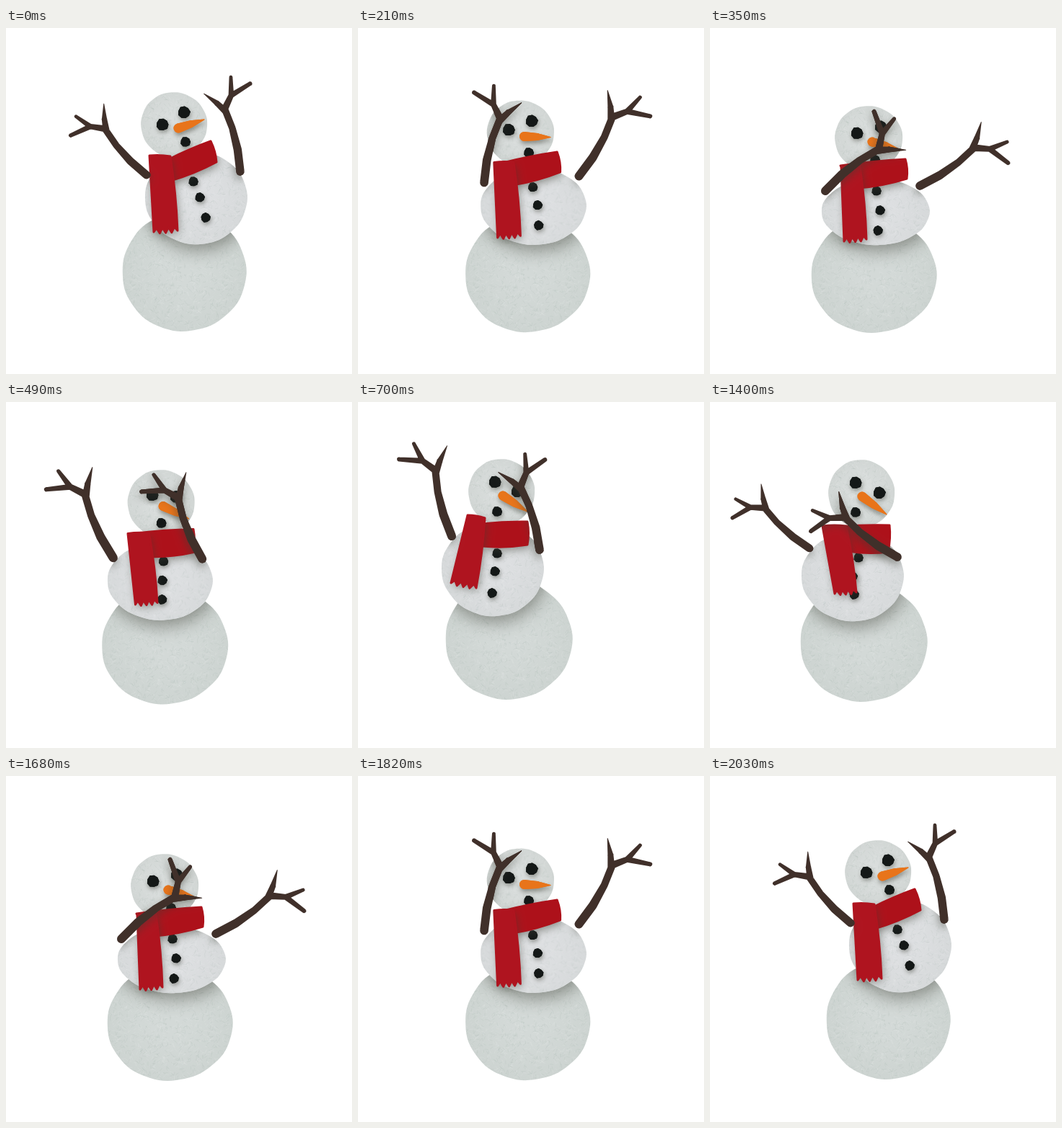
Recreate the animation shown at these times as an HTML page with a canvas. Size 480 by 480 pixels, loop 2100 ms.

```html
<!DOCTYPE html>
<html lang="en">
<head>
<meta charset="utf-8">
<title>Dancing snowman</title>
<style>
html, body { margin: 0; height: 100%; overflow: hidden; background: #fff; }
canvas { display: block; width: 100vw; height: 100vh; }
</style>
</head>
<body>
<canvas id="stage" width="480" height="480"></canvas>
<script>
const ctx = document.getElementById('stage').getContext('2d');
const STEP = 70, STEPS = 30;

// Balls: x, y, rx, ry. Scarf pieces: four corners, clockwise from top left.
const reach = {
  base: [247, 338, 86, 83], torso: [264, 236, 71, 64], head: [233, 134, 46, 45],
  eyes: [217, 134, 247, 117], nose: [239, 139, 275, 127], mouth: [249, 158],
  buttons: [260, 213, 269, 235, 277, 263],
  collar: [226, 182, 284, 157, 292, 186, 228, 212],
  tail: [199, 177, 228, 178, 238, 281, 205, 283]
};
const squash = {
  base: [227, 343, 87, 80], torso: [230, 255, 75, 46], head: [220, 153, 47, 45],
  eyes: [204, 146, 237, 137], nose: [225, 158, 262, 168], mouth: [229, 183],
  buttons: [231, 226, 236, 253, 233, 281],
  collar: [181, 191, 271, 182, 273, 209, 205, 222],
  tail: [182, 193, 208, 192, 217, 293, 186, 296]
};
const lean = {
  base: [213, 333, 88, 83], torso: [198, 242, 71, 62], head: [210, 127, 46, 47],
  eyes: [202, 112, 235, 126], nose: [211, 131, 245, 156], mouth: [202, 153],
  buttons: [206, 216, 198, 242, 200, 267],
  collar: [180, 173, 249, 171, 247, 208, 192, 207],
  tail: [156, 172, 189, 172, 203, 264, 173, 266]
};
const stretch = {
  base: [209, 329, 88, 84], torso: [187, 232, 71, 65], head: [199, 125, 46, 46],
  eyes: [190, 111, 221, 124], nose: [201, 130, 235, 152], mouth: [193, 152],
  buttons: [193, 210, 190, 235, 186, 265],
  collar: [172, 169, 235, 166, 235, 198, 172, 200],
  tail: [152, 157, 176, 161, 164, 258, 129, 251]
};
const sway = {
  base: [205, 335, 89, 83], torso: [179, 239, 69, 66], head: [200, 136, 46, 46],
  eyes: [194, 121, 224, 139], nose: [201, 141, 231, 170], mouth: [190, 162],
  buttons: [184, 217, 180, 242, 176, 272],
  collar: [160, 179, 227, 171, 227, 206, 160, 208],
  tail: [147, 163, 172, 176, 108, 258, 85, 241]
};
const bodyKeys = [[0, reach], [5, squash], [9, lean], [10, stretch], [13, sway], [14, sway]];

// Arms: shoulder x, y, angle in degrees, scale, flip.
const armKeys = [
  [0, { left: [195, 204, -42, .92, 1], right: [325, 199, -14, .95, -1] }],
  [1, { left: [190, 203, -24, .95, 1], right: [322, 192, 4, 1.02, -1] }],
  [5, { left: [160, 226, 52, 1, 1], right: [291, 219, 55, .98, -1] }],
  [8, { left: [143, 211, -62, 1.04, 1], right: [263, 217, -60, .97, 1] }],
  [9, { left: [138, 203, -48, .89, 1], right: [260, 215, -53, .97, 1] }],
  [10, { left: [130, 186, -14, 1, 1], right: [252, 205, -17, .97, -1] }],
  [13, { left: [127, 186, 20, 1.02, 1], right: [236, 206, 27, .94, -1] }],
  [14, { left: [126, 189, 26, 1.02, 1], right: [234, 209, 33, .94, -1] }]
];

function poseAt(keys, s) {
  let i = 0;
  while (i < keys.length - 2 && s >= keys[i + 1][0]) i++;
  const [t0, a] = keys[i], [t1, b] = keys[i + 1];
  const t = (s - t0) / (t1 - t0);
  const pose = {};
  for (const part in a) pose[part] = a[part].map((v, n) => v + (b[part][n] - v) * t);
  return pose;
}

// Felt: short fibres scattered by a seeded generator.
function makeFelt() {
  let seed = 7;
  const rand = () => (seed = seed * 16807 % 2147483647) / 2147483647;
  const tile = document.createElement('canvas');
  tile.width = tile.height = 128;
  const g = tile.getContext('2d');
  for (let i = 0; i < 900; i++) {
    const x = rand() * 128, y = rand() * 128, a = rand() * 6.28;
    g.strokeStyle = rand() < .5 ? 'rgba(255,255,255,.1)' : 'rgba(70,95,90,.05)';
    g.beginPath();
    g.moveTo(x, y);
    g.lineTo(x + 5 * Math.cos(a), y + 5 * Math.sin(a));
    g.stroke();
  }
  return ctx.createPattern(tile, 'repeat');
}
const felt = makeFelt();

// The shadow falls only on pieces already laid down.
function lay(path, fill, blur, dx, dy, fuzzy) {
  ctx.save();
  ctx.fillStyle = fill;
  if (blur) {
    ctx.globalCompositeOperation = 'source-atop';
    ctx.shadowColor = 'rgba(60,62,52,.5)';
    ctx.shadowBlur = blur;
    ctx.shadowOffsetX = dx;
    ctx.shadowOffsetY = dy;
    ctx.fill(path);
  }
  ctx.globalCompositeOperation = 'source-over';
  ctx.shadowColor = 'transparent';
  ctx.fill(path);
  if (fuzzy) {
    ctx.fillStyle = felt;
    ctx.fill(path);
  }
  ctx.restore();
}

function ball([x, y, rx, ry], light, dark, seed, blur) {
  const path = new Path2D();
  for (let i = 0; i < 90; i++) {
    const a = i / 90 * Math.PI * 2;
    const k = 1 + .006 * Math.sin(3 * a + seed) + .004 * Math.sin(11 * a + seed * 2);
    path.lineTo(rx * k * Math.cos(a), ry * k * Math.sin(a));
  }
  path.closePath();
  const shade = ctx.createRadialGradient(0, -ry * .1, rx * .3, 0, 0, rx * 1.1);
  shade.addColorStop(0, light);
  shade.addColorStop(1, dark);
  ctx.save();
  ctx.translate(x, y);
  lay(path, shade, blur, 2, 8, true);
  ctx.restore();
}

function dots(points, r) {
  for (let i = 0; i < points.length; i += 2) {
    const path = new Path2D();
    for (let n = 0; n < 9; n++) {
      const a = n / 9 * Math.PI * 2 + i;
      const k = r * (1 + .06 * Math.sin(n * 2.3));
      path.lineTo(points[i] + k * Math.cos(a), points[i + 1] + k * Math.sin(a));
    }
    path.closePath();
    lay(path, '#141817', 6, 1, 3);
  }
}

// Tapered strip with round ends.
function twig(path, x0, y0, x1, y1, w0, w1) {
  const len = Math.hypot(x1 - x0, y1 - y0);
  const nx = (y0 - y1) / len / 2, ny = (x1 - x0) / len / 2;
  path.moveTo(x0 + nx * w0, y0 + ny * w0);
  path.lineTo(x1 + nx * w1, y1 + ny * w1);
  path.lineTo(x1 - nx * w1, y1 - ny * w1);
  path.lineTo(x0 - nx * w0, y0 - ny * w0);
  path.closePath();
  for (const [x, y, r] of [[x0, y0, w0 / 2], [x1, y1, w1 / 2]]) {
    path.moveTo(x + r, y);
    path.arc(x, y, r, 0, Math.PI * 2, true);
  }
}

const branch = new Path2D();
twig(branch, 0, 0, -4, -32, 12, 12);
twig(branch, -4, -32, -4, -64, 12, 10);
twig(branch, -4, -64, 0, -94, 10, 10);
twig(branch, 0, -91, 9, -105, 10, 8);
twig(branch, 9, -105, 24, -123, 8, 1);
twig(branch, 0, -94, -14, -111, 10, 8);
twig(branch, -14, -111, -20, -137, 8, 5);
twig(branch, -14, -111, -45, -121, 8, 6);

function arm([x, y, angle, size, flip]) {
  ctx.save();
  ctx.translate(x, y);
  ctx.rotate(angle * Math.PI / 180);
  ctx.scale(flip < 0 ? -size : size, size);
  lay(branch, '#40302a', 12, -1, 5);
  ctx.restore();
}

function carrot([x0, y0, x1, y1]) {
  const path = new Path2D();
  const mx = (x0 + x1) / 2, my = (y0 + y1) / 2;
  twig(path, x0, y0, mx, my, 13, 10);
  twig(path, mx, my, x1, y1, 10, 1);
  lay(path, '#e8741a', 6, 1, 4);
}

function cloth(p, fill, fringe) {
  const path = new Path2D();
  const [ax, ay, bx, by, cx, cy, dx, dy] = p;
  path.moveTo(ax, ay);
  path.quadraticCurveTo((ax + bx) / 2, (ay + by) / 2 - 2, bx, by);
  path.quadraticCurveTo((bx + cx) / 2 + 3, (by + cy) / 2, cx, cy);
  if (fringe) {
    const ux = (dx - ax) / 100, uy = (dy - ay) / 100;
    for (let i = 1; i < 8; i++) {
      const t = i / 8, cut = i % 2 ? -5 : 2;
      path.lineTo(cx + (dx - cx) * t + ux * cut, cy + (dy - cy) * t + uy * cut);
    }
    path.lineTo(dx, dy);
  } else {
    path.quadraticCurveTo((cx + dx) / 2, (cy + dy) / 2 + 4, dx, dy);
  }
  path.closePath();
  lay(path, fill, 12, 2, 5);
  ctx.strokeStyle = fill;
  ctx.lineWidth = 3;
  ctx.lineJoin = 'round';
  ctx.stroke(path);
}

function draw(s) {
  const body = poseAt(bodyKeys, s), arms = poseAt(armKeys, s);
  ctx.clearRect(0, 0, 480, 480);
  ball(body.base, '#d3d9d7', '#ccd3d0', 1);
  ball(body.torso, '#dddfe1', '#d5d8d9', 4, 24);
  ball(body.head, '#d9dddc', '#d0d5d3', 2, 12);
  dots(body.eyes, 8.5);
  dots(body.mouth, 7);
  carrot(body.nose);
  dots(body.buttons, 6.7);
  cloth(body.collar, '#ad111a');
  cloth(body.tail, '#af141f', true);
  arm(arms.left);
  arm(arms.right);
}

let shown = -1;
function tick() {
  const step = Math.floor(performance.now() / STEP) % STEPS;
  const s = Math.min(step, STEPS - 1 - step);
  if (s !== shown) draw(shown = s);
  requestAnimationFrame(tick);
}
tick();
</script>
</body>
</html>
```
